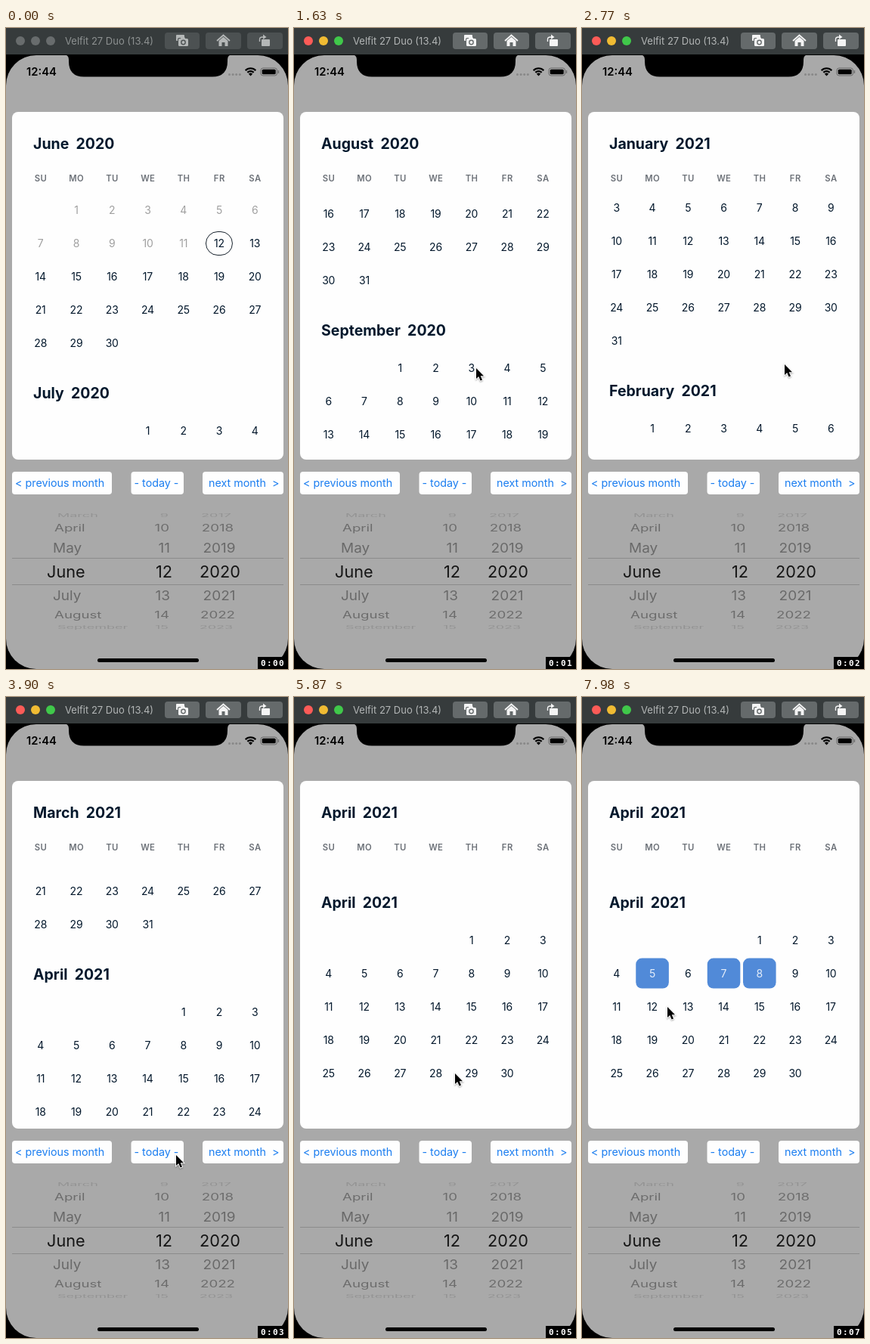
These frames come from a looping animation (373x848 px, 8 s). An HTML page with a canvas:

```html
<!DOCTYPE html>
<html lang="en">
<head>
<meta charset="utf-8">
<title>Calendar list</title>
<style>
html, body { margin: 0; width: 100%; height: 100%; overflow: hidden; background: #000; }
canvas { display: block; }
</style>
</head>
<body>
<canvas id="stage" width="373" height="848"></canvas>
<script>
const ctx = document.getElementById('stage').getContext('2d');
const LOOP = 8000;
const INK = '#03182c';
const GRAY = '#a9a9a9';
const MONTHS = ['January', 'February', 'March', 'April', 'May', 'June', 'July',
  'August', 'September', 'October', 'November', 'December'];
const WEEKDAYS = ['SU', 'MO', 'TU', 'WE', 'TH', 'FR', 'SA'];
const LIST_TOP = 191, ROW = 44;

const SEGMENTS = [[0, 450, 1], [450, 1630, 8], [1630, 2770, 8], [2770, 3900, 8], [3900, 4590, 5],
  [4590, 5030, 3], [5030, 5870, 6], [5870, 7000, 8], [7000, 7980, 7], [7980, 8000, 1]];

// Pointer path: [time, x, y]
const POINTER = [[450, 250, 480], [600, 250, 480], [900, 246, 230], [1630, 241, 450],
  [2010, 247, 490], [2300, 262, 250], [2770, 268, 445], [3900, 225, 606], [4590, 213, 602],
  [5030, 213, 602], [5570, 213, 498], [5870, 213, 498], [6430, 236, 368], [6850, 182, 372],
  [7100, 186, 370], [7500, 92, 370], [7600, 92, 370], [7980, 113, 410]];

// Day of April 2021 and the time it gets picked
const PICKS = [[8, 6420], [7, 7100], [5, 7540]];

// June 2020 to April 2021
const sections = [];
for (let i = 0, top = 0; i < 11; i++) {
  const first = new Date(2020, 5 + i, 1);
  const days = new Date(2020, 6 + i, 0).getDate();
  const offset = first.getDay();
  sections.push({ index: i, top, days, offset, title: `${MONTHS[first.getMonth()]}  ${first.getFullYear()}` });
  top += 72 + ROW * Math.ceil((offset + days) / 7);
}

function snap(t) {
  const [start, end, steps] = SEGMENTS.find(s => t < s[1]);
  const size = (end - start) / steps;
  return start + Math.floor((t - start) / size) * size;
}

const glide = (t, start, from, to) => to - (to - from) * Math.exp((start - t) / 540);

// Two drags, each followed by an exponential glide
function scrollAt(t) {
  if (t < 600) return 0;
  if (t < 900) return 250 * ((t - 600) / 300) ** 2;
  if (t < 2010) return glide(t, 900, 250, 872);
  if (t < 2300) return 792 + 240 * ((t - 2010) / 290) ** 3;
  return glide(Math.min(t, 5870), 2770, 2135, 2930);
}

function pointerAt(t) {
  const i = Math.max(1, POINTER.findIndex(p => p[0] >= t));
  const [t0, x0, y0] = POINTER[i - 1], [t1, x1, y1] = POINTER[i];
  const u = (t - t0) / (t1 - t0), e = u * u * (3 - 2 * u);
  return [x0 + (x1 - x0) * e, y0 + (y1 - y0) * e];
}

// Text centred vertically on its capital height
function text(str, x, cy, size, color, { weight = 400, align = 'left', spacing = 0, family = 'Inter, sans-serif' } = {}) {
  ctx.font = `${weight} ${size}px ${family}`;
  ctx.letterSpacing = spacing + 'px';
  ctx.textAlign = align;
  ctx.fillStyle = color;
  ctx.fillText(str, x, cy + size * 0.364);
}

function box(x, y, w, h, r, fill) {
  ctx.beginPath();
  ctx.roundRect(x, y, w, h, r);
  ctx.fillStyle = fill;
  ctx.fill();
}

function disc(x, y, r, fill) {
  ctx.beginPath();
  ctx.arc(x, y, r, 0, 7);
  ctx.fillStyle = fill;
  ctx.fill();
}

function shape(d, fill) {
  ctx.fillStyle = fill;
  ctx.fill(new Path2D(d));
}

function line(d, color, width) {
  ctx.strokeStyle = color;
  ctx.lineWidth = width;
  ctx.stroke(new Path2D(d));
}

function titleBar(active) {
  box(0, 0, 373, 35, 0, '#363b3c');
  const lights = active ? ['#fc5b57', '#f0bb33', '#40c84a'] : ['#686c6d', '#686c6d', '#686c6d'];
  lights.forEach((c, i) => disc(19 + 20 * i, 17, 6, c));
  text('Velfit 27 Duo (13.4)', 78, 17, 13, active ? '#b3b6b6' : '#8d9191');
  const face = active ? '#656a6b' : '#4c5152';
  const icon = active ? '#f4f4f4' : '#b4b7b7';
  [[210, 46], [264, 47], [319, 47]].forEach(([x, w]) => box(x, 6, w, 22, 4, face));
  // camera
  box(225, 9, 11, 8, 1, icon);
  box(227, 13, 15, 12, 2, face);
  box(228, 14, 13, 10, 1.5, icon);
  box(231, 12.5, 6, 3, 1, icon);
  disc(234.5, 19, 3.4, face);
  disc(234.5, 19, 2, icon);
  // home
  line('M279 17 L287.500 9.500 L296 17', icon, 1.8);
  shape('M281.500 17 L287.500 11.800 L293.500 17 V24 H289.500 V19 H285.500 V24 H281.500 Z', icon);
  // rotate
  box(338, 15, 11, 9, 1, icon);
  line('M335.500 18 V15 Q335.500 12 339 12 H341', icon, 1.4);
  shape('M340 8.500 L344.500 12 L340 15 Z', icon);
}

function statusBar() {
  shape('M76 35 H300 Q293 35 293 42 V44 Q293 64.500 273 64.500 H103 Q83 64.500 83 44 V42 Q83 35 76 35 Z', '#000');
  text('12:44', 27, 58, 14.8, '#000', { weight: 600 });
  for (let i = 0; i < 4; i++) disc(295.5 + 4.6 * i, 61.5, 1.5, '#888');
  ctx.strokeStyle = '#000';
  ctx.lineWidth = 2.3;
  for (const r of [5.8, 9.6]) {
    ctx.beginPath();
    ctx.arc(323.5, 63, r, -Math.PI * 0.75, -Math.PI * 0.25);
    ctx.stroke();
  }
  shape('M323.500 63.500 L320.900 60.700 Q323.500 58.500 326.100 60.700 Z', '#000');
  ctx.beginPath();
  ctx.roundRect(337, 53, 21.5, 10, 3);
  ctx.strokeStyle = '#6a6a6a';
  ctx.lineWidth = 1;
  ctx.stroke();
  box(338.7, 54.7, 18, 6.6, 1.6, '#000');
  box(359.8, 56, 1.3, 4, 0.6, '#6a6a6a');
}

function monthTitle(title, y) {
  text(title, 36, y, 19.5, INK, { weight: 700 });
}

function monthSection({ index, days, offset, title }, top, t) {
  monthTitle(title, top);
  for (let day = 1; day <= days; day++) {
    const cell = offset + day - 1;
    const x = 45.7 + 47.25 * (cell % 7);
    const y = top + 50 + ROW * Math.floor(cell / 7);
    const picked = index === 10 && PICKS.some(p => p[0] === day && t >= p[1]);
    if (picked) box(x - 21.7, y - 20, 43.6, 40, 8, '#518ad8');
    if (index === 0 && day === 12) {
      ctx.beginPath();
      ctx.roundRect(x - 17.5, y - 15.5, 35, 31, 15.5);
      ctx.strokeStyle = '#17222c';
      ctx.lineWidth = 1;
      ctx.stroke();
    }
    const color = picked ? '#e4edf9' : index === 0 && day < 12 ? '#a0a0a0' : INK;
    text(String(day), x, y, 14, color, { align: 'center', spacing: -0.2 });
  }
}

function calendar(t) {
  const scroll = scrollAt(t);
  box(8, 111, 359, 460, 8, '#fefefe');
  ctx.save();
  ctx.beginPath();
  ctx.rect(8, 219, 359, 342);
  ctx.clip();
  for (const section of sections) {
    const top = LIST_TOP + section.top - scroll;
    if (top > -200 && top < 600) monthSection(section, top, t);
  }
  ctx.restore();
  const current = sections.filter(s => LIST_TOP + s.top - scroll < 284).pop();
  monthTitle(current.title, 153);
  WEEKDAYS.forEach((name, i) =>
    text(name, 46 + 47.25 * i, 199, 11.3, '#6c7178', { weight: 600, align: 'center', spacing: 0.4 }));
}

function buttons() {
  [[8, 132, 12, '< previous month'], [165.5, 69.5, 169.5, '- today -'], [260, 107, 268, 'next month  >']]
    .forEach(([x, w, tx, label]) => {
      box(x, 587, w, 30, 4, '#fefefe');
      text(label, tx, 602, 14.3, '#1a7df0');
    });
}

// Date wheel seen as a cylinder: 24 degrees between items
function wheel() {
  const sizes = [21.7, 19, 18.7, 18];
  const alphas = [0.88, 0.38, 0.36, 0.13];
  const left = [54, 62, 64, 68], right = [220, 217, 216, 215], centre = [283, 282, 280, 278];
  for (let i = -3; i <= 3; i++) {
    const n = Math.abs(i), angle = i * 24 * Math.PI / 180;
    const color = `rgba(0,0,0,${alphas[n]})`;
    ctx.save();
    ctx.translate(0, 719 + 77.4 * Math.sin(angle));
    ctx.scale(1, Math.cos(angle));
    text(MONTHS[5 + i], left[n], 0, sizes[n], color);
    text(String(12 + i), right[n], 0, sizes[n], color, { align: 'right' });
    text(String(2020 + i), centre[n], 0, sizes[n], color, { align: 'center' });
    ctx.restore();
  }
  line('M8 701.500 H367 M8 736.500 H367', '#8b8b8b', 1);
}

function pointer(t) {
  const [x, y] = pointerAt(t);
  ctx.save();
  ctx.translate(x, y);
  const arrow = new Path2D('M0 0 V14 L3.200 11 L5.600 16.500 L8 15.500 L5.700 10.300 H10 Z');
  ctx.shadowColor = 'rgba(0,0,0,.35)';
  ctx.shadowBlur = 2;
  ctx.shadowOffsetY = 1;
  ctx.strokeStyle = '#fff';
  ctx.lineWidth = 1.8;
  ctx.stroke(arrow);
  ctx.shadowColor = 'transparent';
  ctx.fillStyle = '#000';
  ctx.fill(arrow);
  ctx.restore();
}

function draw(t) {
  const active = t >= 450;
  box(0, 0, 373, 848, 0, '#000');
  titleBar(active);
  box(0, 36, 373, 812, 40, GRAY);
  statusBar();
  calendar(t);
  buttons();
  wheel();
  box(121, 834, 134, 5, 2.5, '#000');
  if (active) pointer(t);
  box(333, 832, 40, 16, 0, '#000');
  text(`0:0${Math.floor(t / 1000)}`, 337, 840, 11, '#fff',
    { weight: 700, spacing: 1.4, family: '"DejaVu Sans Mono", monospace' });
}

function tick() {
  draw(snap(performance.now() % LOOP));
  requestAnimationFrame(tick);
}
tick();
</script>
</body>
</html>
```
